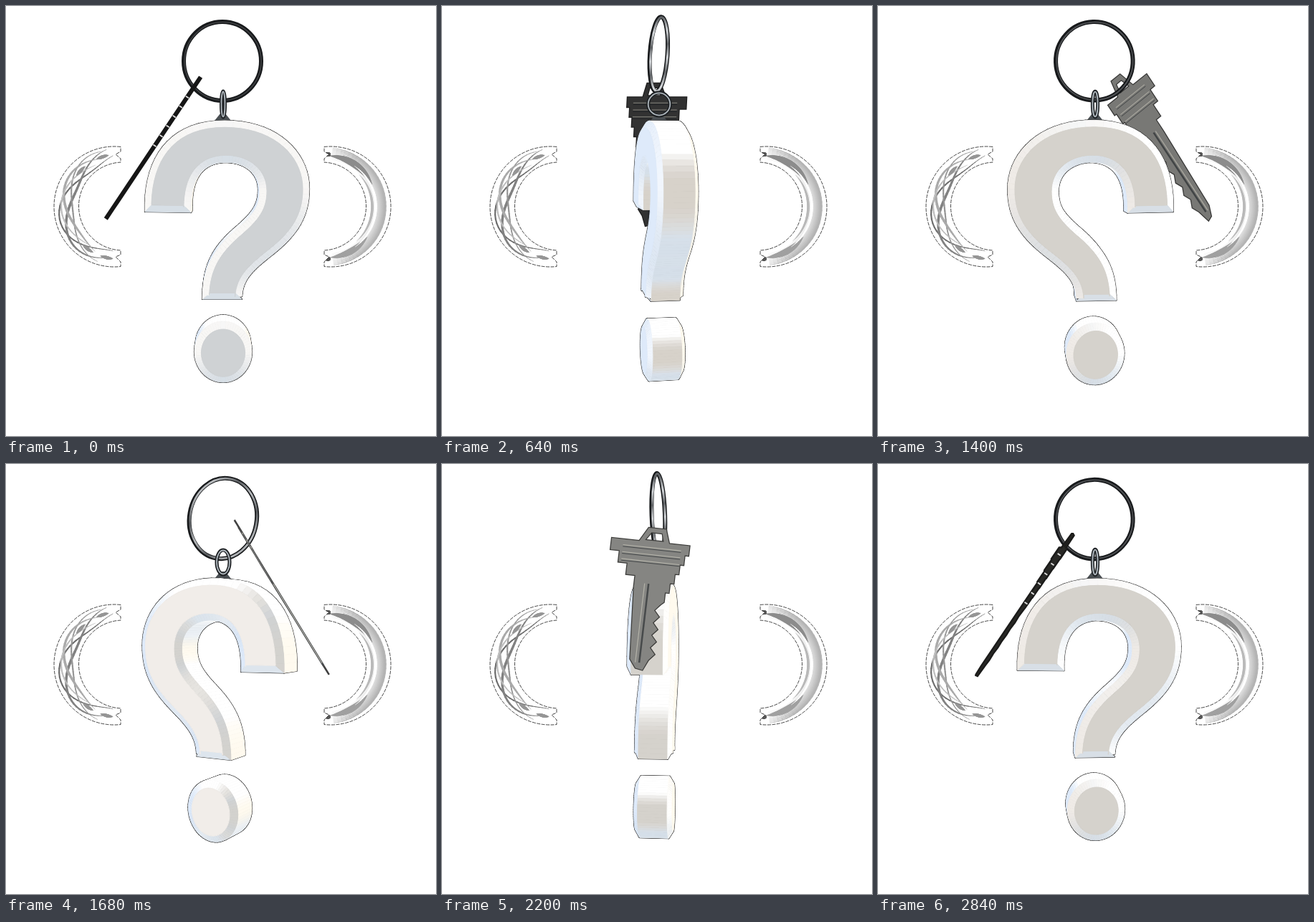
An HTML page with a canvas for the animation above (2.88 s loop, 600 by 600 pixels).

```html
<!DOCTYPE html>
<html lang="en">
<head>
<meta charset="utf-8">
<title>Question mark keychain</title>
<style>
html, body { margin: 0; width: 100%; height: 100%; overflow: hidden; background: #fff; }
canvas { display: block; width: 600px; height: 600px; }
</style>
</head>
<body>
<canvas id="stage" width="600" height="600"></canvas>
<script>
const LOOP = 2880, STEP = 40;
const AXIS = 302, HORIZON = 220, CAMERA = 1000;
const ctx = document.getElementById('stage').getContext('2d');

const clamp = v => Math.max(0, Math.min(1, v));
const mix = (a, b, t) => a.map((v, i) => v + (b[i] - v) * t);
const rgb = c => `rgb(${c.map(Math.round).join(',')})`;
const gray = v => rgb([v, v, v]);
const rad = deg => deg * Math.PI / 180;
const times = (n, fn) => Array.from({ length: n }, (_, i) => fn(i));

// ---------- solid question mark ----------
const FRONT = 15, BACK = -25, BEVEL_DEPTH = 6, BEVEL_WIDTH = 9.5;
const RIM_SCALE = CAMERA / (CAMERA - FRONT);

function cubic(a, b, c, d, n = 18) {
  return times(n, i => {
    const t = i / n, u = 1 - t;
    return [0, 1].map(k => u*u*u*a[k] + 3*u*u*t*b[k] + 3*u*t*t*c[k] + t*t*t*d[k]);
  });
}

function trace(p) {
  const out = [];
  for (let i = 0; i + 3 < p.length; i += 3) out.push(...cubic(...p.slice(i, i + 4)));
  return [...out, p[p.length - 1]];
}

const hookOutline = [
  ...trace([[194,287], [192,215], [225,160], [305,160], [380,160], [423,205], [423,255],
    [423,300], [400,325], [368,350], [340,372], [329,385], [329,409]]),
  ...trace([[274,409], [274,365], [290,340], [318,315], [345,292], [354,280], [354,258],
    [354,232], [332,218], [307,218], [275,218], [256,240], [258,288]])
];
const dotOutline = times(64, i => {
  const a = i / 64 * 2 * Math.PI;
  return [303 + 40 * Math.cos(a), 482.5 + 42.5 * Math.sin(a)];
});

function makeSolid(outline) {
  const n = outline.length;
  const points = outline.map(([x, y]) => [(x - AXIS) / RIM_SCALE, (y - HORIZON) / RIM_SCALE]);
  const normals = points.map((p, i) => {
    const q = points[(i + 1) % n], dx = q[0] - p[0], dy = q[1] - p[1], len = Math.hypot(dx, dy);
    return [dy / len, -dx / len];
  });
  const layer = (z, inset) => points.map((p, i) => {
    const a = normals[(i + n - 1) % n], b = normals[i];
    const k = inset / (1 + a[0]*b[0] + a[1]*b[1]);
    return [p[0] - (a[0] + b[0]) * k, p[1] - (a[1] + b[1]) * k, z];
  });
  return {
    normals,
    layers: [layer(FRONT + BEVEL_DEPTH, BEVEL_WIDTH), layer(FRONT, 0), layer(BACK, 0), layer(BACK - BEVEL_DEPTH, BEVEL_WIDTH)]
  };
}

const solids = [hookOutline, dotOutline].map(makeSolid);

const turn = ([x, y, z], c, s) => [x * c - z * s, y, x * s + z * c];
function project(p, c, s) {
  const [x, y, z] = turn(p, c, s), k = CAMERA / (CAMERA - z);
  return [AXIS + x * k, HORIZON + y * k, z];
}
const area = pts => pts.reduce((sum, p, i) => {
  const q = pts[(i + 1) % pts.length];
  return sum + p[0] * q[1] - q[0] * p[1];
}, 0);

// White studio: blue light on the left, cream on the right, gray where the surface mirrors the camera.
function shade([nx, ny, nz]) {
  let c = [255, 255, 255];
  c = mix(c, [222, 234, 250], clamp((-nx - 0.62) / 0.24));
  c = mix(c, [255, 250, 238], clamp((nx - 0.77) / 0.1));
  c = mix(c, [170, 190, 210], clamp(ny) * clamp(nz));
  const warm = mix([212, 210, 205], [218, 209, 199], clamp(Math.abs(nx) / 0.4));
  const facing = mix([207, 210, 212], warm, clamp(Math.abs(nx) / 0.08));
  return mix(c, facing, clamp((nz - 0.8) / 0.17));
}

function tracePoly(pts) {
  ctx.beginPath();
  pts.forEach(p => ctx.lineTo(p[0], p[1]));
  ctx.closePath();
}

function drawSolid({ normals, layers }, c, s) {
  const n = normals.length;
  const view = layers.map(layer => layer.map(p => project(p, c, s)));
  const faces = [];
  for (const k of c > 0 ? [2, 1, 0] : [0, 1, 2]) {
    const tilt = 0.83 * (1 - k), out = k === 1 ? 1 : 0.55;
    const band = [];
    for (let i = 0; i < n; i++) {
      const j = (i + 1) % n;
      const pts = [view[k][i], view[k+1][i], view[k+1][j], view[k][j]];
      if (area(pts) <= 0) continue;
      const normal = turn([normals[i][0] * out, normals[i][1] * out, tilt], c, s);
      band.push({ pts, color: shade(normal), depth: pts.reduce((sum, p) => sum + p[2], 0) });
    }
    faces.push(...band.sort((a, b) => a.depth - b.depth));
  }
  faces.push({ pts: view[c > 0 ? 0 : 3], color: shade(turn([0, 0, Math.sign(c)], c, s)) });

  ctx.lineJoin = 'round';
  ctx.strokeStyle = '#333';
  ctx.lineWidth = 2.2;
  for (const f of faces) { tracePoly(f.pts); ctx.stroke(); }
  ctx.lineWidth = 1;
  for (const f of faces) {
    tracePoly(f.pts);
    ctx.fillStyle = ctx.strokeStyle = rgb(f.color);
    ctx.fill();
    ctx.stroke();
  }
}

// ---------- key: u runs from the hole to the tip, v across the bow ----------
const stairs = (n, u0, u1, v0, v1) => times(n, i => {
  const v = v0 + (v1 - v0) * i / (n - 1), at = k => u0 + (u1 - u0) * k / n;
  return [[at(i), v], [at(i + 1), v]];
}).flat();

const KEY_SHAPE = [
  [-.02, .12], [.08, .18],
  ...stairs(6, .08, .5, .44, .2),
  ...times(10, i => [.52 + i * .045, i % 2 ? .09 : .16]),
  [1, .03], [.99, -.06], [.93, -.14],
  ...stairs(4, .08, .41, -.55, -.2).reverse(),
  [.08, -.2], [-.02, -.1]
];
const KEY_HOLE = [[.01, -.06], [.01, .08], [.07, .11], [.07, -.13]];

function drawKey(deg, c, s) {
  const top = [AXIS - 33 * c, 103 + 9 * s];
  const near = CAMERA / (CAMERA + 155 * s);
  const tip = [AXIS - 155 * c * near + 12 * Math.cos(rad(deg - 130)), 297 + 10 * s];

  // The key hangs still for a while, then twists back and forth twice.
  const swing = deg < 105 ? 0 : -30 * Math.sin(Math.PI * (deg - 105) / 127.5) ** 2;
  const wx = -97 * near * Math.sin(rad(deg + swing));
  const wy = 65 * clamp(-Math.cos(rad(deg - 30))) ** 2;
  const open = clamp(Math.abs(wx) / 30);
  const level = (95 + 50 * Math.cos(rad(deg - 235))) * (.4 + .6 * open);
  const color = [level, level, level - 40 * clamp(-c * s)];

  const at = ([u, v]) => [top[0] + (tip[0] - top[0]) * u + wx * v, top[1] + (tip[1] - top[1]) * u + wy * v];
  const line = (a, b, style, width) => {
    ctx.beginPath();
    ctx.moveTo(...at(a));
    ctx.lineTo(...at(b));
    ctx.strokeStyle = style;
    ctx.lineWidth = width;
    ctx.stroke();
  };
  const shape = new Path2D();
  for (const part of [KEY_SHAPE, KEY_HOLE]) {
    part.map(at).forEach((p, i) => i ? shape.lineTo(...p) : shape.moveTo(...p));
    shape.closePath();
  }
  ctx.lineJoin = 'miter';
  ctx.miterLimit = 2;
  ctx.strokeStyle = rgb(mix(color, [20, 20, 20], .65));
  ctx.lineWidth = 6 - 3.5 * open;
  ctx.stroke(shape);
  ctx.fillStyle = rgb(color);
  ctx.fill(shape, 'evenodd');

  const light = rgb(mix(color, [235, 232, 215], .45)), dark = rgb(mix(color, [20, 25, 30], .55));
  if (open === 1) {
    for (let u = .12; u < .26; u += .05) {
      line([u, -.4], [u, .34], light, 1.1);
      line([u + .012, -.4], [u + .012, .34], dark, 1);
    }
    line([.38, -.02], [.95, -.02], dark, 2.5);
    line([.38, -.07], [.95, -.07], light, 1.2);
  } else {
    for (let u = .12; u < .5; u += .07) line([u, 0], [u + .008, 0], '#ddd', 5);
  }
}

// ---------- rings ----------
function ellipse(x, y, rx, ry, tilt, style, width) {
  ctx.beginPath();
  ctx.ellipse(x, y, rx, ry, tilt, 0, 2 * Math.PI);
  ctx.strokeStyle = style;
  ctx.lineWidth = width;
  ctx.stroke();
}

function drawRing(c, s) {
  const x = AXIS + 2 * s * c, y = 77 - 8 * s * s - 2 * s;
  const rx = Math.hypot(54 * c, 8 * s), ry = 55 - 3 * s, tilt = 0.4 * s * c;
  const metal = ctx.createLinearGradient(x - rx, 20, x + rx, 130);
  const shine = clamp(Math.abs(s) * 1.6);
  for (let i = 0; i <= 6; i++) {
    const v = i % 2 ? 215 : 95;
    metal.addColorStop(i / 6, rgb(mix([62, 64, 66], [v, v + 3, v + 6], shine)));
  }
  ellipse(x, y, rx, ry, tilt, '#17191b', 6);
  ellipse(x + .6, y, rx - .5, ry - .5, tilt, metal, 1.6 + 1.4 * shine);
}

function drawLoop(s) {
  const rx = 2.5 + 13 * Math.abs(s), ry = 18 - 2 * Math.abs(s);
  tracePoly([[291, 160], [299, 150], [306, 150], [314, 160]]);
  ctx.fillStyle = '#4a4f53';
  ctx.fill();
  ellipse(303, 137, rx, ry, 0, '#1d2023', 5);
  ellipse(303, 137, rx, ry - .5, 0, '#aeb6bc', 1.8);
}

// ---------- chrome crescents ----------
function crescentPath() {
  const end = Math.acos(9 / 84), inner = Math.PI / 2 + .05;
  const p = new Path2D();
  const notch = (...ys) => ys.forEach((y, i) => p.lineTo(i % 2 ? 153 : 160, y));
  p.arc(151, 280, 84, -end, end, true);
  notch(357, 350, 347);
  p.arc(163, 279.5, 61.5, inner, -inner, false);
  notch(213, 207, 203);
  p.closePath();
  return p;
}

function makeCrescents() {
  const layer = document.createElement('canvas');
  layer.width = layer.height = 600;
  const g = layer.getContext('2d'), path = crescentPath();

  // A streak follows the crescent, thin at both ends.
  function ribbon(radius, from, to, width, level) {
    const n = 40, point = i => {
      const a = from + (to - from) * i / n, r = radius(a);
      return [157 + r * Math.cos(a), 280 + r * Math.sin(a)];
    };
    g.strokeStyle = gray(level);
    for (let i = 0; i < n; i++) {
      g.lineWidth = .6 + width * Math.sin(Math.PI * (i + .5) / n);
      g.beginPath();
      g.moveTo(...point(i));
      g.lineTo(...point(i + 1));
      g.stroke();
    }
  }
  function crescent(paint) {
    g.save();
    g.clip(path);
    g.filter = 'blur(0.7px)';
    g.lineCap = 'round';
    paint();
    g.restore();
    g.lineWidth = .9;
    g.strokeStyle = '#333';
    g.setLineDash([5, 1.5]);
    g.stroke(path);
    g.setLineDash([]);
  }

  crescent(() => {
    for (let i = 0; i < 5; i++) {
      const wave = a => 73 + (11 - i) * Math.sin(a * 2.7 + i * 1.4);
      ribbon(wave, 1.7 + i * .12, 4.6 - i * .1, i % 2 ? 3 : 1.6, 110 + i * 20);
    }
    for (const a of [1.8, 2.2, 3.9, 4.4]) ribbon(() => 73, a - .12, a + .12, 4, 150);
  });
  g.translate(604, 0);
  g.scale(-1, 1);
  crescent(() => {
    for (let i = 0; i < 9; i++) ribbon(() => 66 + i * 2, 1.7, 4.6, 3, 244 - i * 8);
    ribbon(() => 71, 3.6, 4.65, 9, 140);
    ribbon(() => 71, 1.65, 2.5, 8, 160);
    ribbon(() => 64, 2.3, 3.9, 3, 185);
    ribbon(() => 69, 2.2, 4.1, 3, 255);
    for (const a of [1.6, 4.68]) ribbon(() => 73, a - .04, a + .04, 5, 90);
  });
  return layer;
}

const crescents = makeCrescents();

function draw(now) {
  const deg = Math.floor((now % LOOP) / STEP) * 360 * STEP / LOOP;
  const c = Math.cos(rad(deg)), s = Math.sin(rad(deg));
  const keyBehind = deg > 0 && deg < 180;
  ctx.fillStyle = '#fff';
  ctx.fillRect(0, 0, 600, 600);
  ctx.drawImage(crescents, 0, 0);
  if (keyBehind) drawKey(deg, c, s);
  drawRing(c, s);
  drawLoop(s);
  solids.forEach(solid => drawSolid(solid, c, s));
  if (!keyBehind) drawKey(deg, c, s);
}

const start = performance.now();
function tick() {
  draw(performance.now() - start);
  requestAnimationFrame(tick);
}
tick();
</script>
</body>
</html>
```
